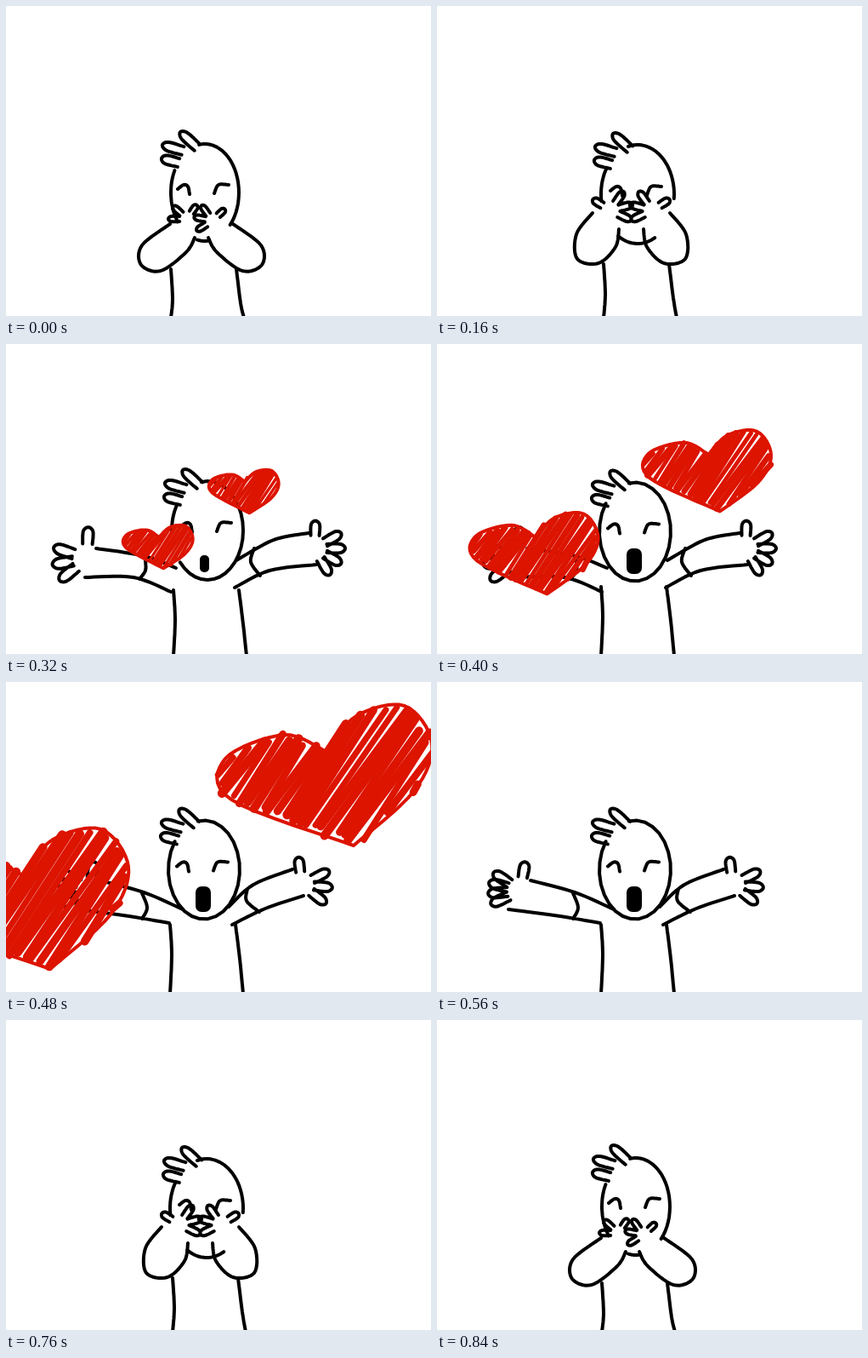
An HTML page that plays this animation: 500 px wide and 364 px high, repeating every 880 ms.

```html
<!DOCTYPE html>
<html lang="en">
<head>
<meta charset="utf-8">
<title>Blowing kisses</title>
<style>
html, body { margin: 0; width: 100%; height: 100%; overflow: hidden; background: #fff; }
svg { display: block; width: 100vw; height: 100vh; }
</style>
</head>
<body>
<svg viewBox="0 0 500 364" fill="none" stroke="#000" stroke-width="4" stroke-linecap="round" stroke-linejoin="round">
  <path id="figure"/>
  <path id="arms"/>
  <rect id="mouth" fill="#000" stroke="none"/>
  <g id="hearts" stroke="#dc1400"></g>
</svg>
<script>
const LOOP = 880, RAD = Math.PI / 180;
const el = id => document.getElementById(id);
const mix = (a, b, k) => a + (b - a) * k;
const polar = (x, y, deg, r) => [x + r * Math.cos(deg * RAD), y + r * Math.sin(deg * RAD)];
const pathOf = pts => "M" + pts.map(p => p.map(n => n.toFixed(1))).join("L");

// Smooth curve through a few key points, sampled as a polyline.
function spline(p) {
  const out = [p[0]];
  for (let i = 0; i < p.length - 1; i++) {
    const a = p[i], b = p[i + 1], before = p[i - 1] || a, after = p[i + 2] || b;
    for (let t = 0.125; t <= 1; t += 0.125) {
      const s = 1 - t;
      out.push([0, 1].map(k => s * s * s * a[k] + t * t * t * b[k]
        + 3 * s * s * t * (a[k] + (b[k] - before[k]) / 6)
        + 3 * s * t * t * (b[k] - (after[k] - a[k]) / 6)));
    }
  }
  return out;
}

const line = (...pts) => pathOf(spline(pts));

function arc([cx, cy, rx, ry], from, to) {
  const pts = [];
  for (let i = 0; i <= 24; i++) {
    const a = mix(from, to, i / 24) * RAD;
    pts.push([cx + rx * Math.cos(a), cy + ry * Math.sin(a)]);
  }
  return pathOf(pts);
}

// Round-tipped loop, open at its base: a finger or a tuft of hair.
function petal(base, tip, w) {
  const dx = tip[0] - base[0], dy = tip[1] - base[1], len = Math.hypot(dx, dy);
  const at = (u, v) => [base[0] + dx * u - dy / len * v * w, base[1] + dy * u + dx / len * v * w];
  return line(at(0, -0.5), at(0.75, -0.5), at(1, 0), at(0.75, 0.5), at(0, 0.5));
}

function hand(x, y, size, thumb, from, to, count) {
  const finger = (deg, inner, outer) =>
    petal(polar(x, y, deg, size * inner), polar(x, y, deg, size * outer), size * 0.28);
  let d = finger(thumb, 0.42, 0.9);
  for (let i = 0; i < count; i++) d += finger(mix(from, to, i / (count - 1)), 0.4, 1);
  return d;
}

const folded = (axis, ...pts) => line(...pts) + line(...pts.map(([x, y]) => [2 * axis - x, y]));

function hair(cx, cy) {
  const tuft = (bx, by, tx, ty) => petal([cx + bx, cy + by], [cx + tx, cy + ty], 10);
  return tuft(-9, -53, -29, -71) + tuft(-26, -49, -50, -56) + tuft(-31, -35, -51, -40);
}

function eyes(cx, cy) {
  const at = (x, y) => [cx + x, cy + y];
  return line(at(-32, -4), at(-25, -9), at(-20, -7), at(-18, 2)) + line(at(11, 1), at(16, -9), at(28, -9));
}

const body = (cx, y) =>
  line([cx - 40, y], [cx - 38, y + 35], [cx - 40, 366]) + line([cx + 37, y], [cx + 42, y + 40], [cx + 46, 366]);

// head: centre and radii; arcs: drawn parts of its outline in degrees;
// mouth: x, y, width, height, corner
const poses = {
  cover: {
    head: [234, 219, 40, 57], arcs: [[-100, 42], [85, 103], [143, 207]], waist: 309,
    arms: folded(230, [193, 256], [160, 281], [159, 304], [182, 311], [212, 289], [222, 272])
      + hand(213, 250, 22, -55, 180, 222, 2) + hand(243, 252, 22, -43, 148, 234, 3)
  },
  cheeks: {
    head: [236, 221, 43, 58], arcs: [[-105, 5], [62, 122], [172, 212]], waist: 303,
    arms: folded(228.5, [183, 243], [164, 268], [165, 297], [190, 302], [210, 283], [214, 262])
      + hand(204, 240, 27, 212, -55, 25, 3) + hand(253, 240, 27, -32, 155, 235, 3)
  },
  reach: {
    head: [237, 219, 42, 58], arcs: [[-100, 140], [180, 212]], waist: 289, mouth: [228, 248, 11, 20, 5],
    arms: line([106, 240], [163, 249], [200, 263]) + line([93, 274], [150, 274], [194, 291])
      + line([157, 276], [164, 266], [164, 254]) + hand(95, 252, 41, -87, 141, 199, 3)
      + line([271, 254], [315, 230], [356, 222]) + line([269, 286], [310, 266], [365, 259])
      + line([292, 240], [288, 256], [299, 272]) + hand(363, 240, 36, -88, -30, 60, 4)
  },
  shout: {
    head: [233, 220.5, 42, 58], arcs: [[-100, 215]], waist: 285, mouth: [223, 240, 18, 30, 7],
    arms: line([110, 233], [162, 247], [208, 267]) + line([84, 267], [138, 274], [192, 283])
      + line([160, 248], [166, 265], [160, 278]) + hand(98, 245, 38, -80, 155, 214, 4)
      + line([262, 264], [291, 238], [337, 220]) + line([266, 285], [305, 266], [350, 251])
      + line([284, 243], [283, 257], [298, 270]) + hand(348, 238, 36, -97, -27, 38, 3)
  },
  kiss: {
    head: [235, 218.5, 44, 58], arcs: [[-93, 215]], waist: 290, pout: [231, 257],
    arms: line([140, 244], [154, 268], [177, 276], [201, 262]) + line([118, 264], [142, 297], [178, 304])
      + line([177, 277], [185, 291], [176, 306]) + line([195, 293], [183, 303]) + hand(130, 244, 37, -38, 157, 219, 3)
      + line([299, 242], [295, 265], [280, 264], [268, 260]) + line([329, 264], [312, 292], [284, 297])
      + line([284, 267], [281, 278], [287, 298]) + line([265, 281], [285, 297]) + hand(314, 240, 38, 229, -36, 29, 4)
  }
};

function pout([x, y]) {
  return line([x - 3, y + 1], [x - 1, y - 8], [x + 7, y - 4], [x, y])
    + line([x, y], [x + 9, y + 6], [x + 1, y + 11], [x - 4, y + 8]);
}

// One heart around its notch, placed and sized per flight.
const leftLobe = [[0, 0], [-50, -20], [-119, 8], [-112, 56], [32, 110]];
const rightLobe = [[32, 110], [103, 46], [124, -10], [92, -54], [35, -42], [0, 0]];
const outline = [...spline(leftLobe), ...spline(rightLobe)];
const flights = [
  { from: [180, 227], to: [20, 227], seed: 7 },
  { from: [281, 162], to: [377, 82], seed: 23 }
];

function random(seed) {
  return () => (seed = (seed * 16807) % 2147483647) / 2147483647;
}

// Scribbled filling: slanted strokes between the edges of the shape.
function hatch(shape, grow, seed) {
  const rnd = random(seed * 7919), gap = mix(4.5, 9, grow);
  const c = Math.cos(55 * RAD), s = Math.sin(55 * RAD);
  const turned = shape.map(([x, y]) => [x * c - y * s, x * s + y * c]);
  const across = turned.map(p => p[1]), end = Math.max(...across);
  let out = "";
  for (let v = Math.min(...across) + gap * 0.6; v < end; v += gap) {
    const cuts = [];
    turned.forEach((a, i) => {
      const b = turned[(i + 1) % turned.length];
      if ((a[1] > v) !== (b[1] > v)) cuts.push(mix(a[0], b[0], (v - a[1]) / (b[1] - a[1])));
    });
    cuts.sort((a, b) => a - b);
    for (let i = 0; i + 1 < cuts.length; i += 2) {
      const u0 = cuts[i] + 2 + (rnd() * 12 - 3) * grow, u1 = cuts[i + 1] - 2 - (rnd() * 12 - 3) * grow;
      const skew = (rnd() - 0.5) * gap * 0.8, width = gap * (0.75 + rnd() * 0.45);
      const at = (u, w) => [u * c + w * s, w * c - u * s];
      if (u1 > u0) out += `<path d="${pathOf([at(u0, v - skew), at(u1, v + skew)])}" stroke-width="${width.toFixed(1)}"/>`;
    }
  }
  return out;
}

function heart({ from, to, seed }, grow) {
  const size = mix(0.32, 1, grow), turn = mix(8, 0, grow) * RAD;
  const c = size * Math.cos(turn), s = size * Math.sin(turn);
  const x0 = mix(from[0], to[0], grow), y0 = mix(from[1], to[1], grow);
  const shape = outline.map(([x, y]) => [x0 + x * c - y * s, y0 + x * s + y * c]);
  return `<path d="${pathOf(shape)}"/>` + hatch(shape, grow, seed);
}

// at: start in ms; grow: how far the hearts have flown, 0 to 1
const steps = [
  { at: 0, pose: "cover" },
  { at: 80, pose: "cover", arms: "cheeks", move: "translate(-3 4)" },
  { at: 160, pose: "cheeks" },
  { at: 240, pose: "kiss" },
  { at: 320, pose: "reach", grow: 0 },
  { at: 400, pose: "shout", arms: "reach", grow: 0.4 },
  { at: 440, pose: "shout", grow: 0.7 },
  { at: 480, pose: "shout", grow: 1 },
  { at: 560, pose: "shout" },
  { at: 600, pose: "kiss", arms: "shout", move: "translate(6 0) scale(.975 1)" },
  { at: 680, pose: "kiss" },
  { at: 760, pose: "cheeks" },
  { at: 840, pose: "cover" }
];

let shown;
function draw(time) {
  const step = steps.filter(s => s.at <= time % LOOP).pop();
  if (step === shown) return;
  shown = step;
  const pose = poses[step.pose], [cx, cy] = pose.head;
  const face = pose.arcs.map(([a, b]) => arc(pose.head, a, b)).join("") + hair(cx, cy) + eyes(cx, cy);
  el("figure").setAttribute("d", face + body(cx, pose.waist) + (pose.pout ? pout(pose.pout) : ""));
  el("arms").setAttribute("d", poses[step.arms || step.pose].arms);
  el("arms").setAttribute("transform", step.move || "");
  const mouth = pose.mouth || [0, 0, 0, 0, 0];
  ["x", "y", "width", "height", "rx"].forEach((name, i) => el("mouth").setAttribute(name, mouth[i]));
  el("hearts").innerHTML = "grow" in step ? flights.map(f => heart(f, step.grow)).join("") : "";
}

const start = performance.now();
function tick() {
  draw(performance.now() - start);
  requestAnimationFrame(tick);
}
tick();
</script>
</body>
</html>
```
